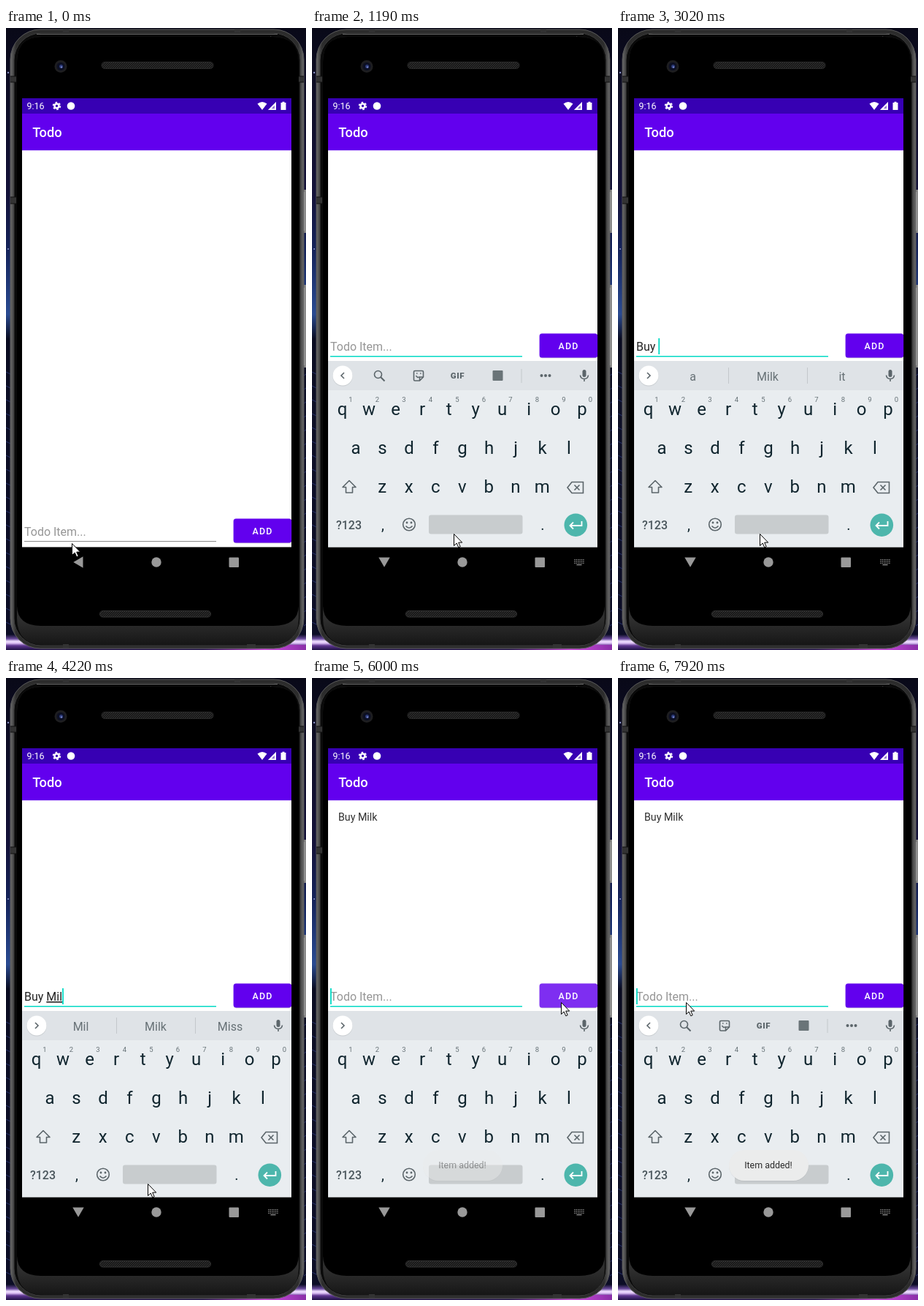
Recreate the animation shown at these times as an HTML page. Size 411 by 850 pixels, loop 8000 ms.

```html
<!DOCTYPE html>
<html lang="en">
<head>
<meta charset="utf-8">
<title>Todo</title>
<style>
html, body { margin: 0; width: 100%; height: 100%; overflow: hidden; background: #080817; }
svg { display: block; width: 411px; height: 850px; }
text { font-family: Roboto, "Open Sans", sans-serif; white-space: pre; }
.mid { text-anchor: middle; }
.med { font-weight: 500; }
.line { fill: none; stroke: #5b656a; stroke-width: 1.6; }
.compose { text-decoration: underline; }
</style>
</head>
<body>
<svg id="stage" viewBox="0 0 411 850" xmlns="http://www.w3.org/2000/svg">
  <defs>
    <linearGradient id="sky" x1="0" y1="0" x2="0" y2="1">
      <stop offset="0" stop-color="#090918"/>
      <stop offset=".27" stop-color="#14123a"/>
      <stop offset=".36" stop-color="#15245c"/>
      <stop offset=".46" stop-color="#2a4b92"/>
      <stop offset=".5" stop-color="#090b20"/>
      <stop offset=".6" stop-color="#0d0f26"/>
      <stop offset=".975" stop-color="#0c0d26"/>
      <stop offset=".982" stop-color="#6a4a9c"/>
      <stop offset=".986" stop-color="#efe0ff"/>
      <stop offset=".989" stop-color="#dcc0f5"/>
      <stop offset=".993" stop-color="#5e3590"/>
      <stop offset="1" stop-color="#1f1244"/>
    </linearGradient>
    <linearGradient id="glow">
      <stop offset="0" stop-color="#c23ad0" stop-opacity="0"/>
      <stop offset=".6" stop-color="#d24be0"/>
      <stop offset="1" stop-color="#8a2fa8"/>
    </linearGradient>
    <linearGradient id="metal">
      <stop offset="0" stop-color="#6c6c6c"/>
      <stop offset=".008" stop-color="#505050"/>
      <stop offset=".02" stop-color="#2c2c2c"/>
      <stop offset=".98" stop-color="#2c2c2c"/>
      <stop offset=".992" stop-color="#505050"/>
      <stop offset="1" stop-color="#6c6c6c"/>
    </linearGradient>
    <linearGradient id="chin" x1="0" y1="0" x2="0" y2="1">
      <stop offset=".96" stop-color="#2e2e2e"/>
      <stop offset="1" stop-color="#161616"/>
    </linearGradient>
    <pattern id="mesh" width="3" height="3" patternUnits="userSpaceOnUse">
      <rect width="3" height="3" fill="#161616"/>
      <path d="M0 3L3 0" stroke="#3b3b3b" stroke-width=".9"/>
    </pattern>
    <clipPath id="display"><rect x="22" y="96" width="369" height="653"/></clipPath>
  </defs>

  <rect width="411" height="850" fill="url(#sky)"/>
  <rect x="270" y="843" width="141" height="7" fill="url(#glow)"/>
  <g id="waves" fill="none" stroke="#26306a" stroke-width="1"></g>
  <circle cx="3" cy="61" r="1.2" fill="#8c93c8"/>
  <circle cx="3" cy="302" r="1" fill="#8c93c8"/>

  <g id="phone">
    <path d="M406 221h5v59h-5zM406 351h5v113h-5z" fill="#8b8b8b"/>
    <path d="M408 224h1v53h-1zM408 355h1v106h-1z" fill="#c9c9c9"/>
    <rect x="6" y="2" width="402" height="846" rx="41" fill="url(#metal)" stroke="#5a5a5a"/>
    <rect x="11" y="7" width="392" height="837" rx="37" fill="#0a0a0a" stroke="#3c3c3c"/>
    <path d="M42 8.500H372" stroke="#666" stroke-width="1"/>
    <path d="M362 12Q388 16 394 38" fill="none" stroke="#777" stroke-width="1"/>
    <path d="M15 806V46Q15 12 49 12H365Q401 12 401 46V806Q401 843 362 843H52Q15 843 15 806Z" fill="url(#chin)"/>
    <path d="M15 790V46Q15 12 49 12H365Q401 12 401 46V790Q400 817 366 817H48Q16 817 15 790Z" fill="#000"/>
    <path d="M6 66h8v8h-8zM6 231h8v9h-8zM401 66h7v8h-7zM78 2h8v5h-8zM313 2h8v5h-8zM78 842h8v5h-8zM330 842h12v5h-12z" fill="#333"/>
    <path d="M6 66h8M6 74h8M6 231h8M6 240h8M401 66h7M401 74h7" stroke="#111"/>
    <rect x="131" y="46.500" width="153" height="9" rx="4.500" fill="url(#mesh)" stroke="#292929"/>
    <rect x="128.500" y="796.500" width="152" height="8.500" rx="4.250" fill="url(#mesh)" stroke="#333"/>
    <circle cx="75" cy="52.500" r="8.500" fill="#1e1e20"/>
    <circle cx="75" cy="52.500" r="5.500" fill="#0c0f22"/>
    <circle cx="75.500" cy="52.500" r="2.500" fill="#2c3a78"/>
    <circle cx="76" cy="53.500" r="1.200" fill="#7482c2"/>
  </g>

  <g id="app">
    <rect x="22" y="96" width="369" height="613.400" fill="#fff"/>
    <rect x="22" y="96" width="369" height="21" fill="#3700b3"/>
    <rect x="22" y="117" width="369" height="50.200" fill="#6200ee"/>
    <g fill="#fff">
      <text x="28.500" y="111" font-size="12.440">9:16</text>
      <circle cx="69.500" cy="106.500" r="3" fill="none" stroke="#fff" stroke-width="2.600"/>
      <circle cx="69.500" cy="106.500" r="4.900" fill="none" stroke="#fff" stroke-width="1.700" stroke-dasharray="2.566"/>
      <circle cx="89" cy="106.500" r="5.300"/>
      <path d="M344.500 103.500Q351 98.500 357.500 103.500L351 112Z"/>
      <path d="M370 101V112H359Z" opacity=".45"/>
      <path d="M370 101V112H359ZM368 105.800L363.600 110.200H368Z" fill-rule="evenodd"/>
      <path d="M376.500 102h2v-1.300h3v1.300h2v10h-7z"/>
      <text class="med" x="36.300" y="149.300" font-size="18.300">Todo</text>
    </g>
    <text id="item" x="36" y="194.500" font-size="14.220" fill="#303030">Buy Milk</text>
    <g id="row">
      <text id="hint" x="25" y="694" font-size="16" fill="#969696">Todo Item...</text>
      <text id="field" x="25" y="694" font-size="16" fill="#222"><tspan id="fixed"></tspan><tspan id="typing" class="compose"></tspan></text>
      <rect id="rule" x="25" y="701" width="263"/>
      <rect id="caret" x="25" y="677" width="1.800" height="22" fill="#03dac5"/>
      <rect x="312" y="672" width="79" height="32.300" rx="3.500" fill="#000" opacity=".18"/>
      <rect x="311.600" y="670.600" width="79.600" height="32.800" rx="3.500" fill="#6200ee"/>
      <rect id="ripple" x="311.600" y="670.600" width="79.600" height="32.800" rx="3.500" fill="#fff"/>
      <text class="mid med" x="351.500" y="691.500" font-size="12.440" letter-spacing="1.110" fill="#fff">ADD</text>
    </g>
  </g>

  <g clip-path="url(#display)">
    <g id="board">
      <rect x="22" y="455" width="369" height="254.400" fill="#e9edf0"/>
      <rect x="22" y="455" width="369" height="40" fill="#dfe3e7"/>
      <circle cx="42" cy="475.700" r="13.700" fill="#b9bec1" opacity=".6"/>
      <circle cx="42" cy="475" r="13.500" fill="#fff"/>
      <path id="chevron" class="line" d="M-2 -4L2 0L-2 4"/>
      <g id="tools">
        <g class="line">
          <circle cx="90.500" cy="473.500" r="5"/><path d="M94 477L99.500 482.500" stroke-width="2"/>
          <path d="M141 468.500H151Q152.500 468.500 152.500 470V477L147.500 482H141Q139.500 482 139.500 480.500V470Q139.500 468.500 141 468.500ZM147.500 482V477H152.500M142.500 475Q144.500 479 147.500 476.500"/>
          <path d="M143 472h1.500M148 472h1.500"/>
        </g>
        <text class="mid" x="199.500" y="479" font-size="11.500" font-weight="900" letter-spacing=".6" fill="#5b656a">GIF</text>
        <rect x="247.500" y="468" width="14" height="14" rx="1" fill="#6a7478"/>
        <path d="M287 466V485" stroke="#c3c8cb"/>
        <g fill="#5b656a"><circle cx="314.500" cy="475" r="2"/><circle cx="320" cy="475" r="2"/><circle cx="325.500" cy="475" r="2"/></g>
      </g>
      <g id="words">
        <path d="M151.500 464V486M259.500 464V486" stroke="#c3c8cb"/>
        <g id="picks" font-size="16" fill="#667075"></g>
        <g id="glass"><path d="M200.500 470H209.500L208.700 484.500H201.300Z" fill="#f8f9f9" stroke="#cdd2d4" stroke-width=".8"/><path d="M200.500 468h9v2.500h-9z" fill="#d3d8da"/></g>
      </g>
      <rect x="370.500" y="467" width="5" height="10" rx="2.500" fill="#5b656a"/>
      <path class="line" d="M367.500 474.500Q368 479.500 373 479.500Q378 479.500 378.500 474.500M373 479.500V483"/>
      <g id="keys" fill="#10252e"></g>
      <path class="line" d="M51 618.500L60 627.500H55.500V635H46.500V627.500H42Z" stroke-linejoin="round"/>
      <path class="line" d="M356 620.500H371.500V635.500H356L350 628ZM359.500 624.500L366.500 631.500M366.500 624.500L359.500 631.500"/>
      <text class="mid med" x="50.500" y="684.500" font-size="16" fill="#4a565c">?123</text>
      <g class="line"><circle cx="133" cy="678.500" r="8.300"/><path d="M128.500 680.500Q133 686 137.500 680.500"/></g>
      <circle cx="130" cy="676" r="1.400" fill="#5b656a"/><circle cx="136" cy="676" r="1.400" fill="#5b656a"/>
      <rect x="160" y="665.500" width="128.500" height="26" rx="3" fill="#c8ccce"/>
      <circle cx="361.300" cy="679.200" r="15.800" fill="#4db6ac"/>
      <path d="M369.500 674V680H354M358 675.500L353.500 680L358 684.500" fill="none" stroke="#fff" stroke-width="1.800"/>
    </g>
  </g>

  <g id="nav" fill="#fff" opacity=".6">
    <path id="back" d="M-6.700 0L6.500 -7.700V7.700Z"/>
    <circle cx="206" cy="730" r="6.700"/>
    <rect x="305.500" y="723.500" width="13.500" height="13.500" rx="1"/>
    <g id="dots"></g>
  </g>

  <g id="toast">
    <rect x="152" y="646" width="109" height="42" rx="21" fill="#000" opacity=".06"/>
    <rect x="152" y="645" width="109" height="42" rx="21" fill="#ebecec"/>
    <text class="mid" x="206" y="670" font-size="12.440" fill="#2b2b2b">Item added!</text>
  </g>
  <path id="mouse" d="M0.500 0.500V16.500L4.200 13L6.800 18.800L9.200 17.700L6.700 12.100H11.700Z" fill="#fff" stroke="#000" stroke-width="1" stroke-linejoin="round"/>
</svg>
<script>
const LOOP = 8000;
const $ = id => document.getElementById(id);
const set = (id, attrs) => { for (const k in attrs) $(id).setAttribute(k, attrs[k]); };
const show = (id, on) => set(id, { opacity: +on });
const label = (s, x, y, size, extra = "") =>
  `<text class="mid" x="${x}" y="${y}" font-size="${size}" ${extra}>${s}</text>`;

// Static parts
const keyRow = (chars, x, y) => [...chars].map((c, i) => label(c, x + i * 36.5, y, 24)).join("");
$("keys").innerHTML =
  keyRow("qwertyuiop", 41.6, 528.8) + keyRow("asdfghjkl", 60, 581.8) + keyRow("zxcvbnm", 96.3, 634.8) +
  [..."1234567890"].map((c, i) => label(c, 53 + i * 36.5, 511, 9.5, 'fill="#667176"')).join("") +
  label(",", 97, 686, 20) + label(".", 316, 686, 20);
$("picks").innerHTML = [102.5, 205, 307].map(x => label("", x, 481.5, 16)).join("");
const picks = [...$("picks").children];

let dots = "";
for (let r = 0; r < 3; r++)
  for (let c = 0; c < 6; c++) dots += `<rect x="${359.3 + c * 2.4}" y="${726 + r * 2.4}" width="1.3" height="1.3"/>`;
$("dots").innerHTML = dots + '<rect x="362.500" y="733" width="7" height="1.200"/>';

let waves = "";
for (let y = 470; y < 830; y += 19) waves += `M0 ${y}l6 3M408 ${y + 5}l3 -2`;
$("waves").innerHTML = `<path d="${waves}"/>`;

// Steps: [time, fixed text, composing text, suggestions]
const TYPED = [
  [0, "", "", null],
  [2220, "", "B", ["B", "But", "Being"]],
  [2710, "", "Bu", ["Bu", "But", "Buying"]],
  [2830, "", "Buy", ["Buy", "But", "Buying"]],
  [3020, "Buy ", "", ["a", "Milk", "it"]],
  [3610, "Buy ", "M", ["M", "Me", "My"]],
  [3980, "Buy ", "Mi", ["Mi", "Milk", "Miss"]],
  [4220, "Buy ", "Mil", ["Mil", "Milk", "Miss"]],
  [4400, "Buy ", "Milk", ["Milk", "", "Dalo"]],
  [5880, "", "", null]
];
const CARET = [[0, 0], [690, 1], [1190, 0], [1730, 1], [3490, 0], [3610, 1], [4890, 0],
  [5390, 1], [6310, 0], [6820, 1], [7330, 0], [7820, 1]];
const TOOLS = [[0, 0], [1000, 1], [2220, 0], [6400, 1]];

const MOUSE = [[0, 90, 704], [59, 90, 704], [60, 84, 701], [230, 84, 701], [390, 80, 689],
  [900, 80, 689], [1190, 194, 691], [5050, 194, 691], [5180, 222, 588], [5300, 251, 483],
  [5480, 307, 452], [5700, 341, 443], [6080, 341, 443], [6300, 215, 441], [6550, 86, 441],
  [6700, 86, 441], [6820, 93, 443], [LOOP, 93, 443]];
const SLIDE = [[0, 85, 0], [720, 85, 0], [810, 39.5, .6], [880, 12, .9], [940, 0, 1], [LOOP, 0, 1]];
const BACK = [[0, 0], [720, 0], [810, -45], [930, -90], [LOOP, -90]];
const RIPPLE = [[0, 0], [5760, 0], [5860, .18], [6080, .18], [6400, 0], [LOOP, 0]];
const TOAST = [[0, 0], [5900, 0], [6000, .42], [6160, 1], [LOOP, 1]];

const stepAt = (table, t) => table.findLast(s => s[0] <= t);
function tween(table, t) {
  const i = Math.max(1, table.findIndex(s => s[0] > t));
  const a = table[i - 1], b = table[i], p = (t - a[0]) / (b[0] - a[0]);
  return a.slice(1).map((v, k) => v + (b[k + 1] - v) * p);
}

function render(t) {
  const [, fixed, typing, words] = stepAt(TYPED, t);
  const focus = t >= 600, up = t >= 690;
  const tools = stepAt(TOOLS, t)[1];

  set("row", { transform: `translate(0 ${up ? -253 : 0})` });
  set("rule", focus ? { height: 1.5, fill: "#03dac5" } : { height: 1, fill: "#8a8a8a" });
  $("fixed").textContent = fixed;
  $("typing").textContent = typing;
  show("hint", !(fixed + typing));
  show("caret", stepAt(CARET, t)[1]);
  set("caret", { x: 25 + (fixed + typing ? $("field").getComputedTextLength() : 0) });
  show("item", t >= 5880);

  const [drop, alpha] = tween(SLIDE, t);
  set("board", { transform: `translate(0 ${drop})`, opacity: alpha });
  set("chevron", { transform: `translate(42 475) scale(${tools ? -1 : 1} 1)` });
  show("tools", tools);
  show("words", !!words);
  if (words) picks.forEach((p, i) => { p.textContent = words[i]; });
  show("glass", !!words && !words[1]);

  set("back", { transform: `translate(99 730) rotate(${tween(BACK, t)[0]})` });
  show("dots", t >= 720);
  set("ripple", { opacity: tween(RIPPLE, t)[0] });
  set("toast", { opacity: tween(TOAST, t)[0] });
  const [x, y] = tween(MOUSE, t);
  set("mouse", { transform: `translate(${Math.round(x)} ${Math.round(y)})` });
}

const start = performance.now();
function frame() {
  render((performance.now() - start) % LOOP);
  requestAnimationFrame(frame);
}
frame();
</script>
</body>
</html>
```
